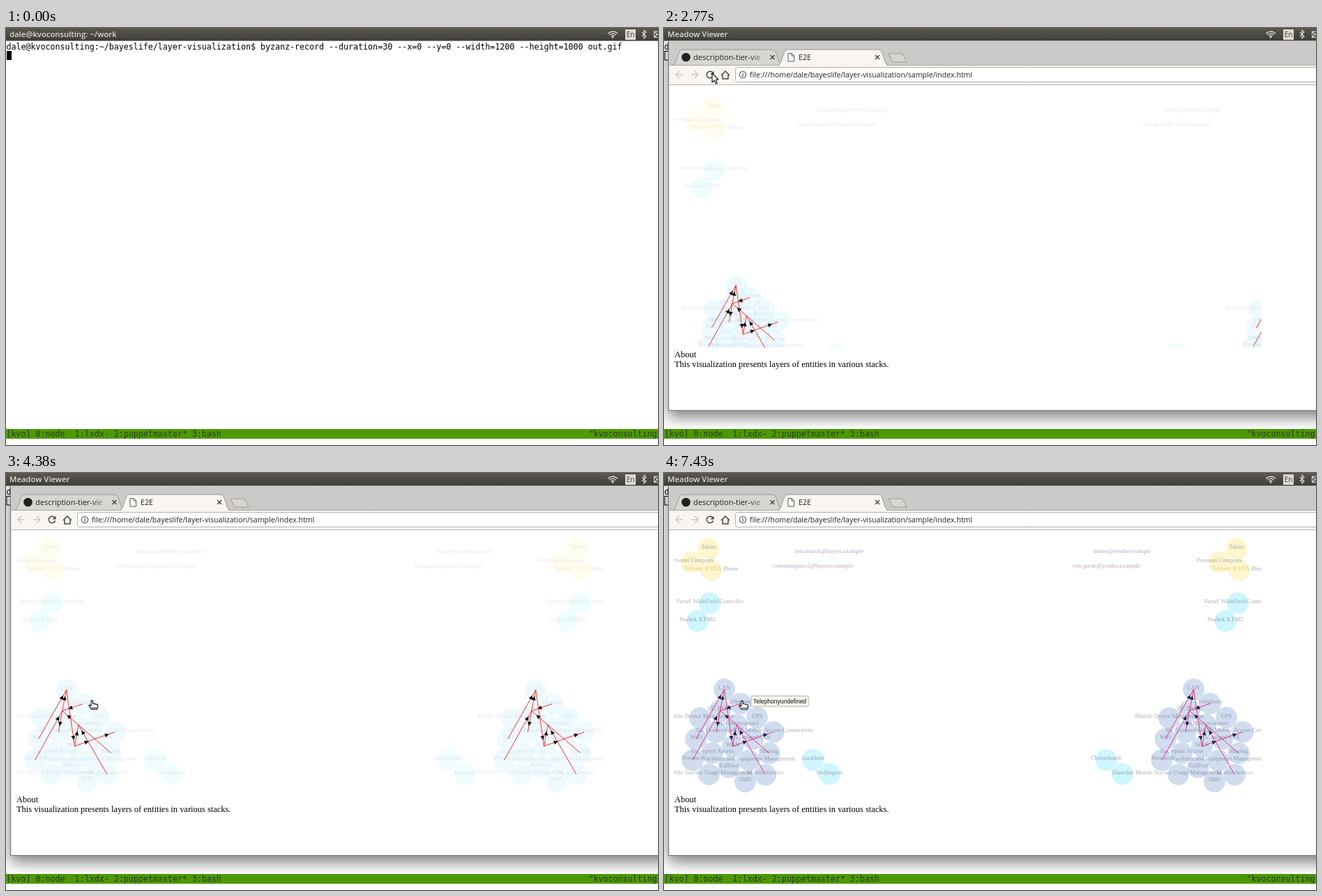
An HTML page with a canvas that plays this animation: 935 by 599 pixels, repeating every 8000 ms.

```html
<!DOCTYPE html>
<html lang="en">
<head>
<meta charset="utf-8">
<title>Layer visualization</title>
<style>
  html, body { margin: 0; width: 100%; height: 100%; overflow: hidden; background: #fff; }
  canvas { position: absolute; left: 0; top: 0; }
</style>
</head>
<body>
<canvas id="desktop" width="935" height="599"></canvas>
<canvas id="browser" width="935" height="599"></canvas>
<script>
const LOOP = 8000, W = 935, H = 599, R = 15.5;
const desktop = document.getElementById('desktop');
const browser = document.getElementById('browser');
let c;

const MONO = '11.65px "DejaVu Sans Mono", monospace';
const UI = '10.6px "Open Sans", sans-serif';
const LABEL = '8.57px "Liberation Serif", serif';
const PAGE = '12.46px "Liberation Serif", serif';
const TIP = '8.5px "Liberation Sans", sans-serif';

const clamp = v => Math.max(0, Math.min(1, v));
const mix = (a, b, k) => a + (b - a) * k;
const rgba = (from, to, k) => `rgba(${from.map((v, i) => mix(v, to[i], k))})`;

function text(s, x, y, font, color, align = 'left') {
  c.font = font;
  c.fillStyle = color;
  c.textAlign = align;
  c.fillText(s, x, y);
}

function rect(x, y, w, h, color) {
  c.fillStyle = color;
  c.fillRect(x, y, w, h);
}

function poly(points, fill, stroke, width = 1, close = true) {
  c.beginPath();
  for (let i = 0; i < points.length; i += 2) c.lineTo(points[i], points[i + 1]);
  if (close) c.closePath();
  paint(fill, stroke, width);
}

function arc(x, y, r, fill, stroke, width = 1, from = 0, to = 2 * Math.PI) {
  c.beginPath();
  c.arc(x, y, r, from, to);
  paint(fill, stroke, width);
}

function paint(fill, stroke, width) {
  if (fill) { c.fillStyle = fill; c.fill(); }
  if (stroke) { c.strokeStyle = stroke; c.lineWidth = width; c.stroke(); }
}

function cross(x, y, r, color) {
  poly([x - r, y - r, x + r, y + r], null, color, 1.4, false);
  poly([x - r, y + r, x + r, y - r], null, color, 1.4, false);
}

// ---------- desktop: panel, terminal, status line ----------
function drawDesktop(focused) {
  rect(0, 0, W, H, '#fff');
  text('dale@kvoconsulting:~/bayeslife/layer-visualization$ byzanz-record --duration=30 ' +
    '--x=0 --y=0 --width=1200 --height=1000 out.gif', 0.5, 31, MONO, '#000');
  if (focused) rect(1, 33, 7, 13, '#000');
  else { c.strokeStyle = '#000'; c.lineWidth = 1; c.strokeRect(1, 33.5, 6.5, 12.5); }

  rect(0, 576, W, 14, '#4e9a06');
  text('[kvo] 0:node  1:lxdx- 2:puppetmaster* 3:bash', 0.5, 587, MONO, '#2a3a1c');
  text('"kvoconsulting', 835.5, 587, MONO, '#2a3a1c');

  const panel = c.createLinearGradient(0, 0, 0, 19);
  panel.addColorStop(0, '#5a5850');
  panel.addColorStop(1, '#3d3c37');
  rect(0, 0, W, 18.5, panel);
  const light = '#dfdbd2';
  text(focused ? 'dale@kvoconsulting: ~/work' : 'Meadow Viewer', 5, 13,
    '600 11.3px "Open Sans", sans-serif', light);
  [3, 6, 9].forEach(r => arc(870, 14, r, null, light, 1.3, -Math.PI * 0.78, -Math.PI * 0.22));
  arc(870, 13.5, 1.2, light);
  rect(888, 2, 15, 15, light);
  text('En', 895.5, 13, '10px "Open Sans", sans-serif', '#3c3b37', 'center');
  poly([912, 6, 918, 12, 915, 15, 915, 3, 918, 6, 912, 12], null, light, 1.1, false);
  c.strokeStyle = light;
  c.strokeRect(929.5, 5, 10, 8.5);
  poly([929.5, 5, 935, 10], null, light, 1.2, false);
  poly([929.5, 13.5, 934, 9], null, light, 1.2, false);
}

// ---------- browser frame ----------
function tab(left, right, fill) {
  c.beginPath();
  c.moveTo(left, 53);
  c.bezierCurveTo(left + 6, 52, left + 6, 31, left + 13, 31);
  c.lineTo(right - 13, 31);
  c.bezierCurveTo(right - 6, 31, right - 6, 52, right, 53);
  paint(fill, '#9c9a97', 1);
}

function drawFrame(loading) {
  c.save();
  c.shadowColor = 'rgba(0,0,0,.5)';
  c.shadowBlur = 20;
  c.shadowOffsetY = 9;
  rect(6, 10, W + 40, 540, '#7c7c7a');
  c.restore();
  rect(7, 18, W, 531, '#e4e2e0');
  rect(7, 19, W, 34, '#cbcac8');
  rect(8, 53, W, 28, '#f9f5f2');
  rect(8, 81, W, 1, '#b4b1ae');
  rect(8, 82, W, 466, '#fff');

  tab(13, 169, '#d8d6d3');
  rect(8, 53, W, 1, '#a9a7a4');
  tab(164, 321, '#f9f5f2');
  rect(166, 53, 153, 2, '#f9f5f2');
  poly([322, 37, 342, 37, 348, 49, 328, 49], '#d8d5d1', '#9c9a97');
  arc(31.5, 42, 6.3, '#24201f');
  const fade = c.createLinearGradient(122, 0, 147, 0);
  fade.addColorStop(0, '#222');
  fade.addColorStop(1, 'rgba(34,34,34,.1)');
  text('description-tier-vie', 42, 46, '11px "Open Sans", sans-serif', fade);
  text('E2E', 193, 46, UI, '#222');
  cross(155.5, 42, 3, '#444');
  cross(306, 42, 3, '#444');
  if (loading) arc(182, 42, 5, null, '#5b7fb5', 1.5, 0.5, 5);
  else {
    poly([178, 36.5, 183, 36.5, 186.5, 40, 186.5, 48, 178, 48], '#fff', '#555');
    poly([183, 36.5, 183, 40, 186.5, 40], null, '#555', 1, false);
  }

  for (const [x, d] of [[22, -1], [44, 1]]) {
    poly([x - 5, 67, x + 5, 67], null, '#cbc7c3', 1.5, false);
    poly([x, 62, x + 5 * d, 67, x, 72], null, '#cbc7c3', 1.5, false);
  }
  if (loading) cross(66, 67, 4, '#444');
  else {
    arc(66, 67, 4.7, null, '#444', 1.6, 0.3, 5.4);
    poly([71.5, 61.5, 71.5, 66.5, 66.5, 66.5], '#444');
  }
  poly([82, 68, 88, 62, 94, 68], null, '#444', 1.5, false);
  poly([84, 67, 84, 73, 92, 73, 92, 67], null, '#444', 1.5, false);
  c.beginPath();
  c.roundRect(102.5, 56.5, W, 21, 3);
  paint('#fff', '#b5b1ad', 1);
  arc(113, 67, 4.7, null, '#555', 1.1);
  rect(112.4, 66, 1.3, 3.8, '#555');
  rect(112.4, 64, 1.3, 1.3, '#555');
  text('file:///home/dale/bayeslife/layer-visualization/sample/index.html', 123, 71, UI, '#222');
}

// ---------- layered graph ----------
const YELLOW = [250, 220, 60], CYAN = [60, 220, 250];

const lattice = [
  [86.5, 310.8, 'LAN', 'Telephony', 'UPS', 'LTE Mobile Access Connectivity'],
  [80.5, 341.3, 'UC PABX', 'WAN Interconnect', 'Managed CTS', 'Sharing'],
  [51.5, 351.9, 'Mobile Device Management', 'SIP Connectivity', 'WAN',
    'Facilities and Equipment Management', 'Mobile Service'],
  [46, 382, 'WiFi', 'Encrypted Access', 'TollFree', 'SMS'],
  [41, 412.5, 'Presence', 'Mobile Service Usage Management']
].flatMap(([x, y, ...names]) => names.map((name, i) => [x + i * 23.5, y + i * 20.4, name]));

const links = [[13, 0], [4, 0], [17, 4], [1, 4], [7, 4], [4, 9], [0, 10], [10, 5], [12, 5], [10, 6], [6, 3]];

const devices = [[64, 108.5, 'Tablet'], [39.5, 128, 'Personal Computer'], [67.5, 139.5, 'Tolvane XXXX Phone']];
const routers = [[65.7, 186.8, 'Varnel WideField Controller'], [48, 212.5, 'Norbek KT482']];
const cities = (a, b) => [[213.5, 412.2, a], [237, 432.6, b]];
const people = (a, b) => [[236.7, 115, a], [213.7, 136, b]];

// shift: column position of the stack; pushX / pushY: where the unsettled layout sits
const groups = [
  ...[0, 757].flatMap(shift => [
    { nodes: devices, shift, pushX: 7, pushY: 6, color: YELLOW },
    { nodes: routers, shift, pushX: 6.5, pushY: 17, color: CYAN }]),
  { nodes: people('lena.marsh@buyers.example', 'commonspace2@buyers.example'), shift: 0, pushX: 34, pushY: 5.5 },
  { nodes: people('bruno@vendor.example', 'tom.garde@vendor.example'), shift: 420.5, pushX: 34, pushY: 5.5 },
  { nodes: cities('Auckland', 'Wellington'), shift: 0, pushX: 34, pushY: 56, color: CYAN },
  { nodes: cities('Christchurch', 'Dunedin'), shift: 420.5, pushX: 34, pushY: 56, color: CYAN },
  ...[0, 673].map(shift => ({ nodes: lattice, shift, pushX: 15, pushY: 50, links }))
];

function drawLink([x1, y1], [x2, y2], lineColor, headColor) {
  poly([x1, y1, x2, y2], null, lineColor, 0.8, false);
  const len = Math.hypot(x2 - x1, y2 - y1), ux = (x2 - x1) / len, uy = (y2 - y1) / len;
  const at = (back, side) => [x2 - ux * back - uy * side, y2 - uy * back + ux * side];
  poly([...at(9, 0), ...at(15, 2.9), ...at(15, -2.9)], headColor);
}

function drawGroup(g, push, shrink, a) {
  const dx = g.shift + push * (g.pushX + g.shift * 0.162), dy = push * g.pushY;
  const scale = g.links ? 1 - shrink : 1;
  const spots = g.nodes.map(([x, y, name]) =>
    [99 + (x - 99) * scale + dx, 377 + (y - 377) * scale + dy, name]);
  const fill = g.color ? rgba([...g.color, 0.08], [...g.color, 0.25], a)
    : rgba([50, 190, 250, 0.08], [70, 120, 190, 0.25], a);
  const ink = rgba([110, 110, 150, 0.17], g.color || g.links ? [80, 75, 100, 0.47] : [115, 55, 115, 0.47], a);

  if (g.color || g.links) spots.forEach(([x, y]) => arc(x, y, R, fill));
  for (const [x, y, name] of spots) {
    let color = ink;
    if (g.color === YELLOW && name.includes('XXXX')) {
      color = c.createLinearGradient(x - 40, 0, x + 40, 0);
      const edge = (40 + R) / 80;
      color.addColorStop(edge, rgba([170, 160, 100, 0.2], [215, 165, 50, 0.55], a));
      color.addColorStop(edge, ink);
    }
    text(name, x, y, LABEL, color, 'center');
  }
  const line = rgba([255, 0, 0, 1], [246, 12, 100, 1], a), head = rgba([0, 0, 0, 1], [28, 28, 82, 1], a);
  for (const [from, to] of g.links || []) drawLink(spots[from], spots[to], line, head);
}

function drawPage(t) {
  if (t > 2300 && t < 2650) return;
  const fresh = t >= 2650;
  const push = fresh ? Math.exp((2770 - t) / 120) : 0;
  const shrink = fresh ? 0.14 * Math.exp((2770 - t) / 650) : 0;
  const strength = fresh ? clamp((t - 7130) / 300) : 1;
  c.save();
  c.beginPath();
  c.rect(14.5, 83, 842, 376.5);
  c.clip();
  groups.forEach(g => drawGroup(g, push, shrink, strength));
  c.restore();
  if (fresh && t < 4700) arc(17, 465, 3, null, '#dcdcdc');
  text('About', 15, 473, PAGE, '#000');
  text('This visualization presents layers of entities in various stacks.', 15, 487, PAGE, '#000');
}

// ---------- pointer ----------
const track = [
  [0, 455, 224], [810, 455, 224], [1000, 330, 235], [1210, 160, 199], [1400, 160, 199],
  [1810, 33, 70], [1950, 31, 59], [2120, 69, 65], [2770, 69, 65], [3580, 68, 66],
  [3810, 85, 190], [4300, 125, 325], [4600, 119, 331], [5490, 119, 331], [6260, 112, 327], [LOOP, 112, 327]
];

function pointerAt(t) {
  const i = track.findIndex(p => p[0] > t);
  const [t0, x0, y0] = track[i - 1], [t1, x1, y1] = track[i];
  const k = (t - t0) / (t1 - t0);
  return [mix(x0, x1, k), mix(y0, y1, k)];
}

function drawPointer(t) {
  const [x, y] = pointerAt(t);
  c.save();
  c.translate(x, y);
  c.lineJoin = 'round';
  if (t < 4300) {
    poly([0, 0, 0, 13, 3, 10.3, 5.2, 15, 7.4, 14, 5.3, 9.4, 9, 9], '#fff', '#111', 1.1);
  } else {
    poly([-1.2, 0.3, 1, 0.3, 1.4, 4.5, 8, 6, 8.5, 8.5, 7.2, 12.8, -0.5, 12.8, -4.5, 7.5, -3.5, 6.3, -1.2, 8],
      '#fff', '#111', 1.1);
    poly([-0.5, 10.6, 7.2, 10.6], null, '#111', 0.9, false);
  }
  c.restore();
}

function drawTooltip() {
  c.save();
  c.shadowColor = 'rgba(0,0,0,.3)';
  c.shadowBlur = 3;
  c.beginPath();
  c.roundRect(125, 320.5, 82, 14.5, 2);
  paint('#f6f5ee');
  c.restore();
  paint(null, '#c4c3bb', 1);
  text('Telephonyundefined', 128, 331, TIP, '#111');
}

function frame(now) {
  const t = now % LOOP;
  c = desktop.getContext('2d');
  drawDesktop(t < 50);

  // the window fades in over five visible steps
  browser.style.opacity = t < 50 ? 0 : clamp((Math.floor((t - 50) / 55) + 1) / 5);
  c = browser.getContext('2d');
  c.clearRect(0, 0, W, H);
  c.save();
  c.beginPath();
  c.rect(0, 18.5, W, H);
  c.clip();
  drawFrame(t > 2210 && t < 2650);
  drawPage(t);
  if (t > 4900) drawTooltip();
  drawPointer(t);
  c.restore();
  requestAnimationFrame(frame);
}
requestAnimationFrame(frame);
</script>
</body>
</html>
```
